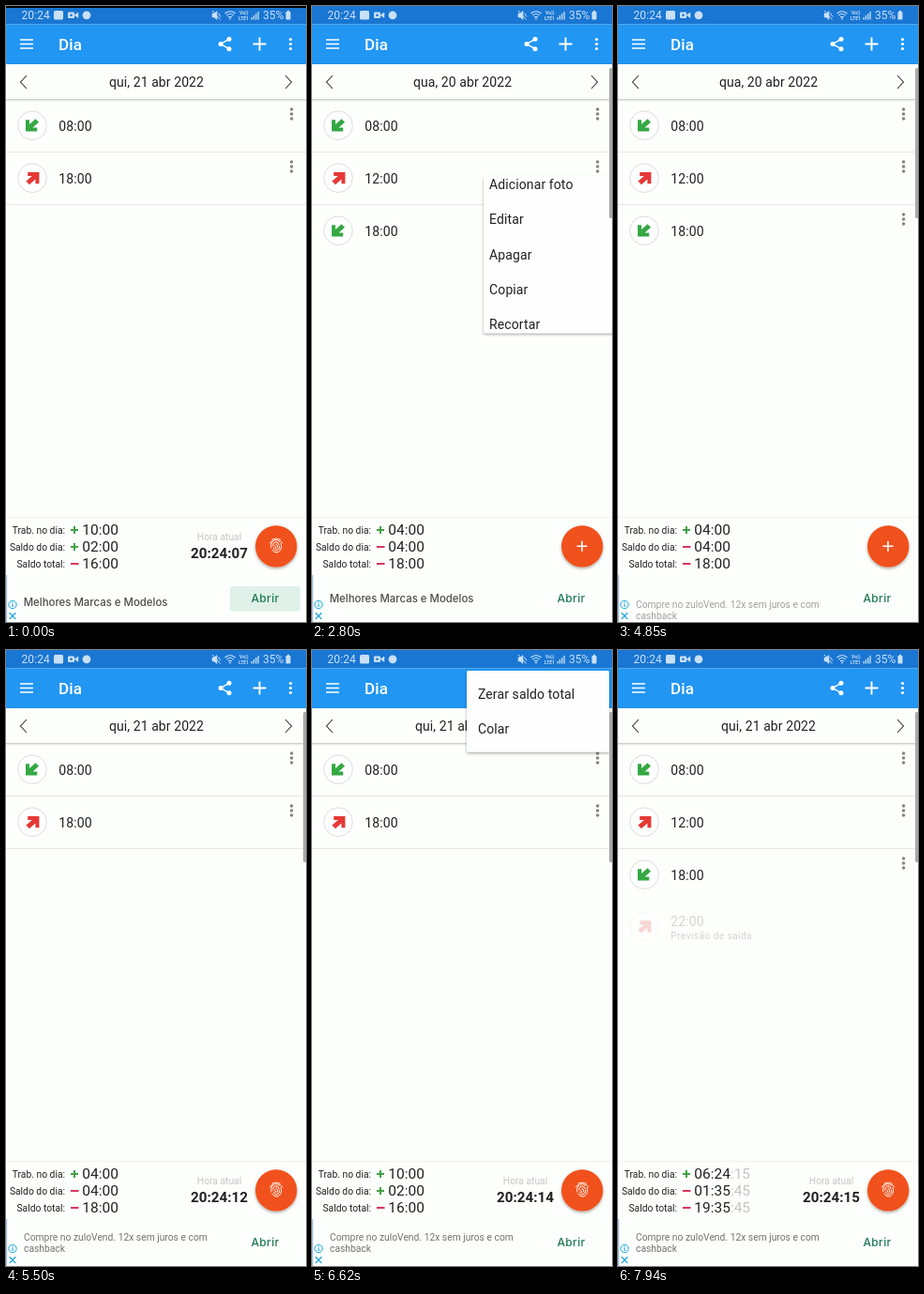
Write an HTML page that moves like this. It is 320 px wide and 656 px high and loops after 8840 ms.

```html
<!DOCTYPE html>
<html lang="pt">
<head>
<meta charset="utf-8">
<style>
html, body { margin: 0; width: 100%; height: 100%; overflow: hidden; background: #fcfffc; }
svg { display: block; width: 100%; height: 100%; font-family: Roboto, sans-serif; }
text { white-space: pre; }
.line { fill: none; stroke-linecap: butt; }
</style>
</head>
<body>
<svg id="stage" viewBox="0 0 320 656">
  <defs>
    <filter id="soft" x="-20%" y="-20%" width="140%" height="140%">
      <feDropShadow dx="0" dy="1.5" stdDeviation="1.6" flood-opacity=".35"/>
    </filter>
    <filter id="bar" x="-5%" y="-10%" width="110%" height="130%">
      <feDropShadow dx="0" dy=".8" stdDeviation=".8" flood-opacity=".3"/>
    </filter>
  </defs>
</svg>
<script>
const LOOP = 8840;
const TICKS = [0, 100, 200, 300, 900, 1450, 1550, 1650, 1750, 1900,
  2580, 2680, 2800, 2900, 3000, 3110, 3230, 3900,
  4250, 4350, 4450, 4550, 4650, 4750, 4850, 4970, 5070,
  5170, 5250, 5330, 5410, 5500, 5600, 5700, 5820, 5920,
  6320, 6420, 6520, 6620, 6940, 7040, 7140, 7240, 7320, 7410, 7510, 7940];
const INK = '#212121', GREEN = '#35a844', RED = '#e53935';
const stage = document.getElementById('stage');

function el(parent, tag, attrs = {}, content) {
  const node = document.createElementNS('http://www.w3.org/2000/svg', tag);
  set(node, attrs);
  if (content !== undefined) node.textContent = content;
  parent.appendChild(node);
  return node;
}
function set(node, attrs) {
  for (const k in attrs) node.setAttribute(k, attrs[k]);
}
const group = (parent, attrs) => el(parent, 'g', attrs);
const rect = (p, x, y, width, height, fill, more) => el(p, 'rect', { x, y, width, height, fill, ...more });
const dot = (p, cx, cy, r, fill, more) => el(p, 'circle', { cx, cy, r, fill, ...more });
const line = (p, d, stroke, w, more) => el(p, 'path', { d, stroke, 'stroke-width': w, class: 'line', ...more });
const text = (p, x, y, size, fill, str, more) => el(p, 'text', { x, y, 'font-size': size, fill, ...more }, str);
const dots = (p, x, y, gap, r, fill) => [-gap, 0, gap].forEach(d => dot(p, x, y + d, r, fill));
const show = (node, on) => { node.style.display = on ? '' : 'none'; };
const fade = (node, a) => { node.style.opacity = a; show(node, a > 0); };
const ramp = (t, from, to) => Math.min(1, Math.max(0, (t - from) / (to - from)));
const pad = n => String(n).padStart(2, '0');

function statusBar() {
  const g = group(stage), c = '#c9e0f6';
  rect(g, 0, 0, 320, 19.5, '#1976d2');
  text(g, 16.5, 14, 12, c, '20:24', { 'letter-spacing': .1 });
  rect(g, 51, 5, 10, 9.5, c, { rx: 1.5 });
  rect(g, 66, 6.5, 7, 6.5, c, { rx: 1 });
  line(g, 'M77 7v5.5l-4-2.7z', c, .5, { style: 'fill:' + c });
  dot(g, 69.5, 9.7, 1.3, '#1976d2');
  dot(g, 86, 9.8, 4.4, c);
  line(g, 'M220 8h2l3-2.5v9l-3-2.5h-2z', c, .5, { style: 'fill:' + c });
  line(g, 'M220 5l8.5 9.5M226.5 7.5l2.5 4', c, 1);
  line(g, 'M233.5 8q5.5-4.5 11 0M235.3 10q3.7-3 7.4 0M237 12q2-1.5 4 0', c, 1.1);
  dot(g, 239, 13.5, .9, c);
  text(g, 249, 9, 5, c, 'Vo))', { 'font-weight': 700 });
  text(g, 248, 14.5, 5, c, 'LTE1', { 'font-weight': 700 });
  for (let i = 0; i < 4; i++) rect(g, 261.5 + i * 2.3, 12 - i * 2, 1.3, 2.5 + i * 2, c);
  text(g, 274, 14, 12, c, '35%');
  rect(g, 298.5, 6, 5, 8.5, c, { rx: .8 });
  rect(g, 300, 4.8, 2, 1.5, c);
  return rect(g, 0, 0, 320, 2, '#000');
}

function toolbar() {
  const g = group(stage), w = '#fff';
  rect(g, 0, 19.5, 320, 42.5, '#2196f3');
  line(g, 'M15 36h14M15 40.5h14M15 45h14', w, 1.6);
  text(g, 56, 47, 17, w, 'Dia', { 'font-weight': 500, 'letter-spacing': .2 });
  line(g, 'M238 35.3l-9 5.2 9 5.2', w, 1.4);
  dot(g, 229, 40.5, 2.5, w);
  dot(g, 238, 35.2, 2.5, w);
  dot(g, 238, 45.8, 2.5, w);
  line(g, 'M263.5 40.5h14M270.5 33.5v14', w, 1.9);
  dots(g, 303.5, 40.5, 5, 1.6, w);
}

function dateBar() {
  const g = group(stage);
  rect(g, -5, 62, 330, 37, '#fdfffd', { filter: 'url(#bar)' });
  const prev = rect(g, 0, 62, 38, 37.5, '#d9dad9', { rx: 11 });
  const next = rect(g, 282, 62, 38, 37.5, '#d9dad9', { rx: 11 });
  line(g, 'M22 74l-6.5 7 6.5 7M298 74l6.5 7-6.5 7', '#333', 1.1);
  const date = text(g, 160.5, 86, 14, INK, '', { 'text-anchor': 'middle', 'letter-spacing': .08 });
  return { prev, next, date };
}

function arrow(p, cy, out) {
  const turn = out ? '' : ' rotate(180)';
  el(p, 'path', {
    d: 'M-5-6.3H7.2V6H3.2V1.2L-3.3 7-6.8 3.4-.3-2.3H-5z',
    fill: out ? RED : GREEN, transform: `translate(28.2 ${cy})${turn}`
  });
}
function badge(p, cy, out) {
  dot(p, 28, cy, 15.3, '#fff', { stroke: '#d8d8d8', 'stroke-width': .9 });
  arrow(p, cy, out);
}
function row(p, i, time, out) {
  const cy = 127.2 + i * 56;
  badge(p, cy, out);
  text(p, 56.3, cy + 5.8, 14, INK, time, { 'letter-spacing': .1 });
  dots(p, 304.6, cy - 12.2, 5, 1.8, '#858585');
}
function list(times) {
  const g = group(stage);
  times.forEach((time, i) => row(g, i, time, i % 2));
  return g;
}
function forecast() {
  const g = group(stage);
  badge(group(g, { opacity: .2 }), 294.5, true);
  text(g, 56.3, 293.5, 14, '#d3d3d3', '22:00', { 'letter-spacing': .1 });
  text(g, 56.3, 307.5, 10.3, '#d3d3d3', 'Previsão de saída', { 'letter-spacing': .35 });
  return g;
}

function totals() {
  const g = group(stage);
  rect(g, 0, 544, 320, 1, '#f0f1f0');
  return ['Trab. no dia:', 'Saldo do dia:', 'Saldo total:'].map((label, i) => {
    const y = 558 + i * 18;
    text(g, 63, y + 3.6, 10.3, INK, label, { 'text-anchor': 'end' });
    const plus = line(g, `M69 ${y}h8M73 ${y - 4}v8`, '#43a047', 2);
    const minus = line(g, `M69 ${y}h8.5`, '#d8345c', 2);
    const value = text(g, 81.3, y + 5.3, 15.5, INK, '');
    const main = el(value, 'tspan');
    const secs = el(value, 'tspan', { fill: '#c4c4c4' });
    return { plus, minus, main, secs };
  });
}

function clockAndFab() {
  const clock = group(stage);
  text(clock, 227.5, 569, 10.3, '#c6c6c6', 'Hora atual', { 'text-anchor': 'middle' });
  const now = text(clock, 227.5, 587.5, 15.2, INK, '', { 'text-anchor': 'middle', 'font-weight': 700 });
  dot(stage, 288.2, 575.4, 22.2, '#f1511b', { filter: 'url(#soft)' });
  const plus = line(stage, 'M282.5 575.3h11M288 569.8v11', '#fff', 1.6);
  const finger = group(stage, { transform: 'translate(288.2 575.3)' });
  // Broken concentric ovals under two brow lines.
  for (let i = 0; i < 3; i++) {
    el(finger, 'ellipse', {
      rx: 1.3 + i * 2.1, ry: 2.3 + i * 2.2, fill: 'none', stroke: '#fff', 'stroke-width': .9,
      'stroke-dasharray': `${6 + i * 5} 1.6`, transform: `rotate(${i * 70})`.replace(/rotate.*/, 'rotate(-8)')
    });
  }
  line(finger, 'M-4.5-7.2Q0-9.2 4.5-7.2M-7-3Q-5-5.8-3-6.6M7-3Q5-5.8 3-6.6', '#fff', .9);
  return { clock, now, plus, finger };
}

function ad() {
  const g = group(stage);
  rect(g, 0, 606, 1.2, 50, '#a8c0ef');
  const button = rect(g, 239, 618, 75, 26.5, '#dff1e8', { rx: 3 });
  const first = group(g), second = group(g);
  const sans = { 'font-family': 'Inter, sans-serif', 'font-weight': 500 };
  text(first, 18.7, 635.2, 11.4, '#4a4d4a', 'Melhores Marcas e Modelos', sans);
  text(second, 19, 628.6, 10.3, '#707370', 'Compre no zuloVend. 12x sem juros e com');
  text(second, 19, 640.8, 10.3, '#707370', 'cashback');
  text(g, 276.5, 635.3, 12, '#1f7a55', 'Abrir', { ...sans, 'text-anchor': 'middle', 'letter-spacing': .35 });
  dot(g, 7, 637.5, 4.2, '#fff', { stroke: '#16a5dc', 'stroke-width': 1 });
  line(g, 'M7 634.8v1.2M7 636.8v3.3', '#16a5dc', 1.2);
  line(g, 'M3.7 646.3l6.6 6.6M10.3 646.3l-6.6 6.6', '#16a5dc', 1.3);
  return { button, first, second };
}

function menu(id, x, y, items, chosen) {
  const w = 152, step = 37.3, h = items.length * step + 12;
  const g = group(stage);
  const clip = el(el(g, 'clipPath', { id }), 'rect');
  const panel = rect(g, x, y, w, h, '#fdfefd', { rx: 1.5, filter: 'url(#soft)' });
  const body = group(g, { 'clip-path': `url(#${id})` });
  const press = rect(body, x, y + 6 + chosen * step, w, step, '#000');
  items.forEach((s, i) => text(body, x + 12, y + 29.7 + i * step, 14, INK, s, { 'letter-spacing': .1 }));
  // Reveals from the anchor: slides left while its clip opens.
  return (t, open, tap, close) => {
    const p = ramp(t, open, open + 300), k = (1 - p) ** 3;
    const ix = 28 * k, iy = Math.min(72, h * .4) * k;
    const box = { x: x + ix, y: y + iy, width: w - 2 * ix, height: h - 2 * iy };
    set(clip, box);
    set(panel, box);
    set(g, { transform: `translate(${56 * k} 0)` });
    press.style.opacity = .14 * ramp(t, tap - 1, tap + 100);
    fade(g, Math.min(1, p * 3) * (1 - ramp(t, close, close + 200)));
  };
}

const topEdge = statusBar();
toolbar();
const head = dateBar();
rect(stage, 0, 155, 320, 1, '#e6e7e6');
rect(stage, 0, 211, 320, 1, '#e6e7e6');
const shortDay = list(['08:00', '18:00']);
const fullDay = list(['08:00', '12:00', '18:00']);
const leave = forecast();
const sums = totals();
const foot = clockAndFab();
const banner = ad();
const itemMenu = menu('itemClip', 165, 165.3, ['Adicionar foto', 'Editar', 'Apagar', 'Copiar', 'Recortar'], 3);
const mainMenu = menu('mainClip', 165, 22, ['Zerar saldo total', 'Colar'], 1);
const handle = rect(stage, 317, 66, 4, 160, '#a9aba9', { rx: 1.5 });

function balances(t, sec) {
  if (t >= 7410) return [['+06:24', sec], ['-01:35', 60 - sec], ['-19:35', 60 - sec]];
  if (t >= 1550 && t < 5600) return [['+04:00'], ['-04:00'], ['-18:00']];
  return [['+10:00'], ['+02:00'], ['-16:00']];
}

function render(t) {
  const before = t >= 1450 && t < 5500, pasted = t >= 7410;
  const sec = 7 + [900, 1900, 2900, 3900, 4900, 5920, 6520, 7940].filter(s => t >= s).length;

  head.date.textContent = before ? 'qua, 20 abr 2022' : 'qui, 21 abr 2022';
  fade(head.prev, t < 1450 ? 0 : 1 - ramp(t, 1450, 1750));
  fade(head.next, t < 5170 ? 0 : 1 - ramp(t, 5170, 5500));
  show(shortDay, !before && !pasted);
  show(fullDay, before || pasted);
  show(leave, pasted);

  balances(t, sec).forEach(([value, s], i) => {
    const sum = sums[i], up = value[0] === '+';
    show(sum.plus, up);
    show(sum.minus, !up);
    sum.main.textContent = value.slice(1);
    sum.secs.textContent = s === undefined ? '' : ':' + pad(s);
  });

  show(foot.clock, !before);
  show(foot.finger, !before);
  show(foot.plus, before);
  foot.now.textContent = '20:24:' + pad(sec);

  const settle = ramp(t, 0, 300), gone = ramp(t, 4450, 4650), come = ramp(t, 4650, 5070);
  fade(banner.button, 1 - settle);
  set(banner.first, { transform: `translate(0 ${4 * (1 - settle) - 12 * gone})` });
  fade(banner.first, 1 - gone);
  set(banner.second, { transform: `translate(0 ${24 * (1 - come)})` });
  fade(banner.second, Math.min(1, come * 1.4));

  show(topEdge, t < 100);
  show(handle, t >= 100);
  itemMenu(t, 2680, 4250, 4350);
  mainMenu(t, 6320, 6940, 7140);
}

const start = performance.now();
let last = -1;
function loop() {
  const t = Math.max(0, performance.now() - start) % LOOP;
  const tick = TICKS.filter(s => s <= t).pop();
  if (tick !== last) render(last = tick);
  requestAnimationFrame(loop);
}
loop();
</script>
</body>
</html>
```
